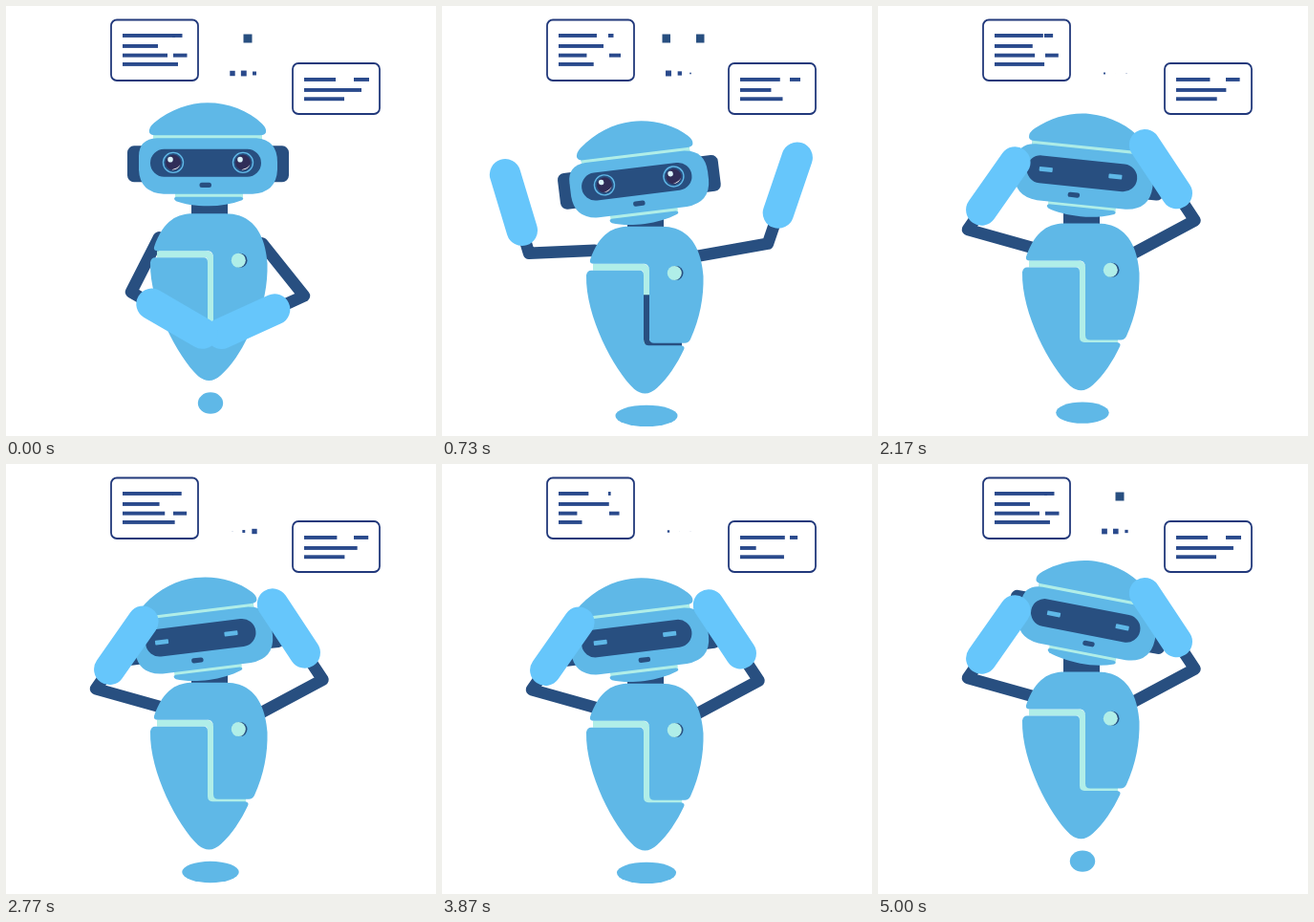
Recreate the animation shown at these times as an HTML page. Size 450 by 450 pixels, loop 5.03 s.

```html
<!DOCTYPE html>
<html lang="en">
<head>
<meta charset="utf-8">
<title>Thinking robot</title>
<style>
  html, body { margin: 0; width: 100%; height: 100%; overflow: hidden; background: #fff; }
  svg { display: block; width: 100%; height: 100%; }
  .navy { fill: #284f80; }
  .blue { fill: #5fb8e7; }
  .pale { fill: #b0eee8; }
  .line { fill: none; stroke-linejoin: round; }
  .limb { stroke: #284f80; stroke-width: 12.5; stroke-linecap: round; }
  .fore { stroke: #66c6fb; stroke-width: 32.5; stroke-linecap: round; }
  .card { fill: #fff; stroke: #22397b; stroke-width: 1.8; }
  .ink { fill: #2a4a8c; }
</style>
</head>
<body>
<svg viewBox="0 0 450 450">
  <rect class="card" x="110" y="14.5" width="91" height="63.5" rx="6"/>
  <rect class="card" x="300" y="60" width="91" height="53" rx="6"/>
  <g id="text"></g>
  <g id="squares" class="navy">
    <rect x="248.5" y="29.5" width="9" height="9"/>
    <rect x="230.5" y="29.5" width="8.5" height="9"/>
    <rect x="266" y="29.5" width="8.5" height="9"/>
  </g>
  <g id="dots"></g>
  <ellipse id="shadow" class="blue" cx="214" ry="11.2"/>

  <g id="robot">
    <path id="limbL" class="line limb"/>
    <path id="limbR" class="line limb"/>
    <rect class="navy" x="194" y="198" width="38" height="22"/>

    <path class="line" stroke="#b0eee8" stroke-width="7" d="M158 258.5H209Q214 258.5 214 264V334Q214 339 219 339H251"/>
    <path id="seam" class="line" stroke="#284f80" stroke-width="6" stroke-dasharray="93 2000" d="M158 259.5H209Q214 259.5 214 265V334Q214 339 219 339H251"/>
    <path class="blue" d="M159 255H212Q217 256 217 262V333Q217 338 222 338H254Q258 338 260 334C270 312 274 290 273.5 268C272 247 265 225 244 218Q238 216 230 216H196C180 216 165 222 155 251Q154 255 159 255Z"/>
    <path class="blue" d="M156 262H207Q211 262 211 267V335Q211 340 216 340.500H250Q255 341 253 345C246 360 236 375 225 385Q213 396 201 386C180 366 150 310 151 267Q152 262 156 262Z"/>
    <circle class="navy" cx="245" cy="264.8" r="7.5"/>
    <circle class="pale" cx="243.3" cy="264.8" r="7.5"/>

    <g id="head">
      <g id="chin">
        <rect class="pale" x="177" y="192" width="71" height="8"/>
        <path class="blue" d="M178 198.500H246Q250 200 247 202C236 206 224 208 212 208C198 208 186 206 178 203Q174 200 178 198.500Z"/>
      </g>
      <rect class="navy" x="127" y="145" width="24" height="38" rx="7"/>
      <rect class="navy" x="272" y="145" width="24" height="38" rx="7"/>
      <rect class="blue" x="154" y="132" width="114" height="8"/>
      <rect id="stripe" class="pale" x="154" y="132" width="114" height="8"/>
      <path class="blue" d="M150 131Q149 126 155 121C172 107 192 100 211 100C232 100 254 108 268 122Q273 127 272 131Q271 134 266 134H156Q151 134 150 131Z"/>
      <path class="blue" d="M158 137H262Q284 139 284 162V170Q283 194 258 195.500H165Q140 194 139 170V156Q139 138 158 137Z"/>
      <rect class="navy" x="151" y="148.500" width="116" height="29" rx="14.500"/>
      <g id="eyes"></g>
      <rect id="mouth" class="navy" x="202.500" y="183.500" width="12.500" height="5.200" rx="2.500"/>
    </g>

    <path id="foreR" class="line fore"/>
    <path id="foreL" class="line fore"/>
  </g>
</svg>
<script>
const LOOP = 5030, BOB = 1600, BOB_HEIGHT = 16, TAU = 2 * Math.PI;
const $ = id => document.getElementById(id);

function set(el, attrs) {
  for (const k in attrs) el.setAttribute(k, attrs[k]);
}

function add(parent, tag, attrs = {}) {
  const el = document.createElementNS('http://www.w3.org/2000/svg', tag);
  set(el, attrs);
  return parent.appendChild(el);
}

const show = (el, on) => set(el, { visibility: on ? 'visible' : 'hidden' });

// Smooth step from 0 at a to 1 at b.
function ease(t, a, b) {
  const u = Math.min(1, Math.max(0, (t - a) / (b - a)));
  return u * u * (3 - 2 * u);
}

// 0 to 1 and back, once per unit of phase.
const wave = phase => (1 - Math.cos(TAU * phase)) / 2;

const bobAt = t => BOB_HEIGHT * wave((t - 100) / BOB) ** .75;

// Each pose: time, elbow x, elbow y, forearm angle.
const arms = [
  { side: 'L', shoulder: [160, 241], gap: 25, poses: [
    [0, 131, 298, 30], [530, 114, 290, 100], [730, 91, 244, 253], [1050, 94, 222.5, 305]] },
  { side: 'R', shoulder: [268, 247], gap: 34, poses: [
    [0, 312, 302, 155.6], [530, 308, 290, 75], [730, 341, 234, -71], [1050, 331.5, 213, -123.5]] }
];

function poseAt(poses, t) {
  const next = poses.findIndex(p => p[0] > t);
  if (next < 0) return poses[poses.length - 1];
  const a = poses[next - 1], b = poses[next], u = (t - a[0]) / (b[0] - a[0]);
  return a.map((v, i) => v + (b[i] - v) * u);
}

function drawArm({ side, shoulder, gap, poses }, t) {
  const [, x, y, turn] = poseAt(poses, t), a = turn / 360 * TAU;
  const along = d => `${x + d * Math.cos(a)} ${y + d * Math.sin(a)}`;
  set($('limb' + side), { d: `M${shoulder}L${x} ${y}L${along(gap)}` });
  set($('fore' + side), { d: `M${along(gap)}L${along(gap + 61)}` });
}

// Text bars: left, top, mean width, swing.
const bars = [
  [122, 29, 43, 12], [174, 29, 6.5, 4],
  [122, 40, 45, -8],
  [122, 49.7, 33, 14], [175, 49.7, 12.5, 2],
  [122, 59, 41, 17],
  [312, 75, 40, -7], [364, 75, 12, 4],
  [312, 86, 38, 22],
  [312, 95.3, 44, -2]
].map(([x, y, mean, swing]) => ({
  el: add($('text'), 'rect', { class: 'ink', x, y, height: 3.9 }), mean, swing
}));

const dots = [237, 248.8, 260].map(x => ({ x, el: add($('dots'), 'rect', { class: 'ink' }) }));

const eyes = [175, 248].map(x => {
  const g = add($('eyes'), 'g', { transform: `translate(${x} 162.5)` });
  const open = add(g, 'g');
  add(open, 'circle', { r: 10.5, fill: 'none', stroke: '#5fb8e7', 'stroke-width': 1.4 });
  add(open, 'circle', { r: 8, fill: '#302d58' });
  add(open, 'circle', { cx: -3, cy: -3.2, r: 2.8, fill: '#d9f3fb' });
  add(open, 'path', { d: 'M7.5 2Q5 8-1.5 7.5Q5 6 7.5 2Z', fill: '#fff' });
  const shut = add(g, 'rect', { x: -7, y: -2.4, width: 14, height: 4.8, rx: .8, class: 'blue' });
  return { open, shut };
});

function drawHead(t, bob) {
  // The head leans left, and swings right once every second bob.
  const s = t % (2 * BOB), begin = ease(t, 0, 400);
  const right = ease(s, 1450, 1750) - ease(s, 2020, 2450);
  const squeeze = begin * (1 - right) * ease(bob, 12.5, 6.5);
  const tilt = begin * (18 * right - 7), drop = begin * (5.3 - 6 * right);
  set($('head'), { transform: `translate(0 ${drop}) rotate(${tilt} 212 206)` });
  set($('chin'), { transform: `translate(0 ${-5 * squeeze})` });
  set($('stripe'), { opacity: 1 - squeeze });

  const look = 7 * (ease(t, 3500, 4370) - ease(t, 1430, 2800));
  const mouth = 21 * ease(t, 3300, 4370) - 6 * ease(t, 1430, 2170) - 7 * ease(t, 4400, 5000);
  set($('eyes'), { transform: `translate(${look} 0)` });
  set($('mouth'), { transform: `translate(${mouth} 0)` });

  const lid = 1 - ease(t, 880, 980), open = lid > .3;
  eyes.forEach(e => {
    set(e.open, { transform: `scale(1 ${lid})` });
    show(e.open, open);
    show(e.shut, !open);
  });
}

function drawThoughts(t) {
  const swell = Math.cos(2 * TAU * t / LOOP);
  bars.forEach(({ el, mean, swing }) => set(el, { width: mean + swing * swell }));

  // Squares go one, none, two while the dots pulse in turn.
  const beat = 6 * t / LOOP, p = beat % 1;
  const count = p < .17 || p > .92 ? 1 : p < .65 ? 0 : 2;
  [...$('squares').children].forEach((sq, i) => show(sq, count === (i ? 2 : 1)));
  dots.forEach(({ el, x }, i) => {
    const size = 6 * wave(beat - .4 - .15 * i);
    set(el, { x: x - size / 2, y: 70.5 - size / 2, width: size, height: size });
  });
}

function draw(t) {
  const bob = bobAt(t);
  set($('robot'), { transform: `translate(0 ${bob})` });
  set($('shadow'), { cy: 414.2 + bob, rx: 11.2 + 1.45 * bob });
  set($('seam'), { 'stroke-dashoffset': .168 * (t - 730) - 82 });
  arms.forEach(arm => drawArm(arm, t));
  drawHead(t, bob);
  drawThoughts(t);
}

const start = performance.now();
function frame() {
  draw((performance.now() - start) % LOOP);
  requestAnimationFrame(frame);
}
frame();
</script>
</body>
</html>
```
